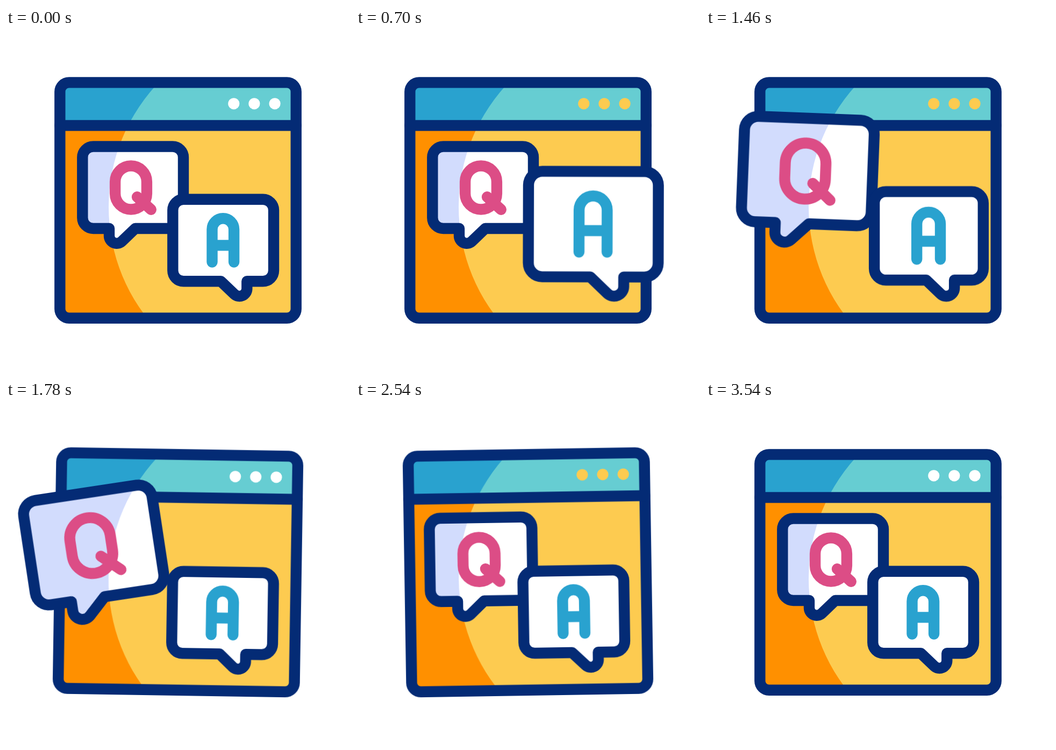
Recreate the animation shown at these times as an HTML page. Size 640 px wide and 640 px high, loop 3600 ms.

```html
<!DOCTYPE html>
<html lang="en">
<head>
<meta charset="utf-8">
<title>Q and A</title>
<style>
  html, body { margin: 0; width: 100%; height: 100%; overflow: hidden; background: #fff; }
  svg { display: block; width: 640px; height: 640px; }
  path, rect { vector-effect: non-scaling-stroke; }
  .line { fill: none; stroke: #042b75; stroke-width: 20.4; stroke-linecap: round; stroke-linejoin: round; }
  .q { --out: -10deg; --tip: 206px 401px; --from: 417px 401px; --wait: 1s; }
  .a { --out: 10deg; --tip: 434px 500px; --from: 275px 500px; --wait: 0s; }

  .sway, .shake, .grow { animation: 3.6s cubic-bezier(.333, 0, .667, 1) infinite; }
  .sway { animation-name: sway; transform-origin: 320px 320.5px; }
  .shake { animation-name: shake; animation-delay: var(--wait); transform-origin: var(--tip); }
  .grow { animation-name: grow; animation-delay: var(--wait); transform-origin: var(--from); }
  .dots { fill: #fff; animation: blink .9s step-end infinite; }

  @keyframes grow {
    0%, 44.444%, 100% { transform: scale(1); }
    11.111%, 33.333% { transform: scale(1.287); }
  }
  @keyframes shake {
    0%, 11.111%, 38.889%, 100% { transform: rotate(0deg); }
    16.667%, 27.778% { transform: rotate(calc(var(--out) * -1)); }
    22.222%, 33.333% { transform: rotate(var(--out)); }
  }
  @keyframes sway {
    0%, 44.444%, 98.333%, 100% { transform: rotate(0deg); }
    55.556%, 77.778% { transform: rotate(2.1deg); }
    66.667%, 88.889% { transform: rotate(-2.1deg); }
  }
  @keyframes blink {
    0%, 87.8% { fill: #fff; }
    37.8% { fill: #fdcb50; }
  }
</style>
</head>
<body>
<svg viewBox="0 0 640 640">
  <defs>
    <path id="bubble" d="M162.3 220.5H310a20 20 0 0 1 20 20V353a20 20 0 0 1-20 20H240.5L215.6 396.9A14 14 0 0 1 192 387V373H162.3a20 20 0 0 1-20-20V240.5a20 20 0 0 1 20-20Z"/>
    <!-- everything left of a large circle -->
    <clipPath id="shade">
      <path clip-rule="evenodd" d="M-100-100H900V800H-100ZM191 333a335 335 0 0 0 670 0a335 335 0 0 0-670 0Z"/>
    </clipPath>
  </defs>

  <g class="sway">
    <rect x="104" y="105" width="432" height="76" fill="#66cdd2"/>
    <rect x="104" y="181" width="432" height="355" fill="#fdcb50"/>
    <g clip-path="url(#shade)">
      <rect x="104" y="105" width="432" height="76" fill="#29a2cf"/>
      <rect x="104" y="181" width="432" height="355" fill="#ff9000"/>
    </g>
    <g class="line">
      <rect x="100.3" y="101.4" width="439.4" height="438.4" rx="17"/>
      <path d="M100.3 181.4H539.7"/>
    </g>
    <g class="dots">
      <circle cx="423.8" cy="140.8" r="10.6"/>
      <circle cx="461.9" cy="140.8" r="10.6"/>
      <circle cx="500.1" cy="140.8" r="10.6"/>
    </g>

    <g class="q">
      <g class="shake"><g class="grow"><use href="#bubble" fill="#fff"/></g></g>
      <g clip-path="url(#shade)">
        <g class="shake"><g class="grow"><use href="#bubble" fill="#d2dcfd"/></g></g>
      </g>
      <g class="shake"><g class="grow line">
        <use href="#bubble"/>
        <g stroke="#dc4d86">
          <rect x="203.1" y="256.5" width="58.8" height="81" rx="29.4"/>
          <path d="M244 314.3L269.8 337.8"/>
        </g>
      </g></g>
    </g>

    <g class="a">
      <g class="shake"><g class="grow line">
        <use href="#bubble" fill="#fff" transform="translate(640.3 98.3) scale(-1 1)"/>
        <path stroke="#29a2cf" d="M383.5 435.5V374.6a20.3 20.3 0 0 1 40.6 0V435.5M383.5 404.4H424.1"/>
      </g></g>
    </g>
  </g>
</svg>
</body>
</html>
```
